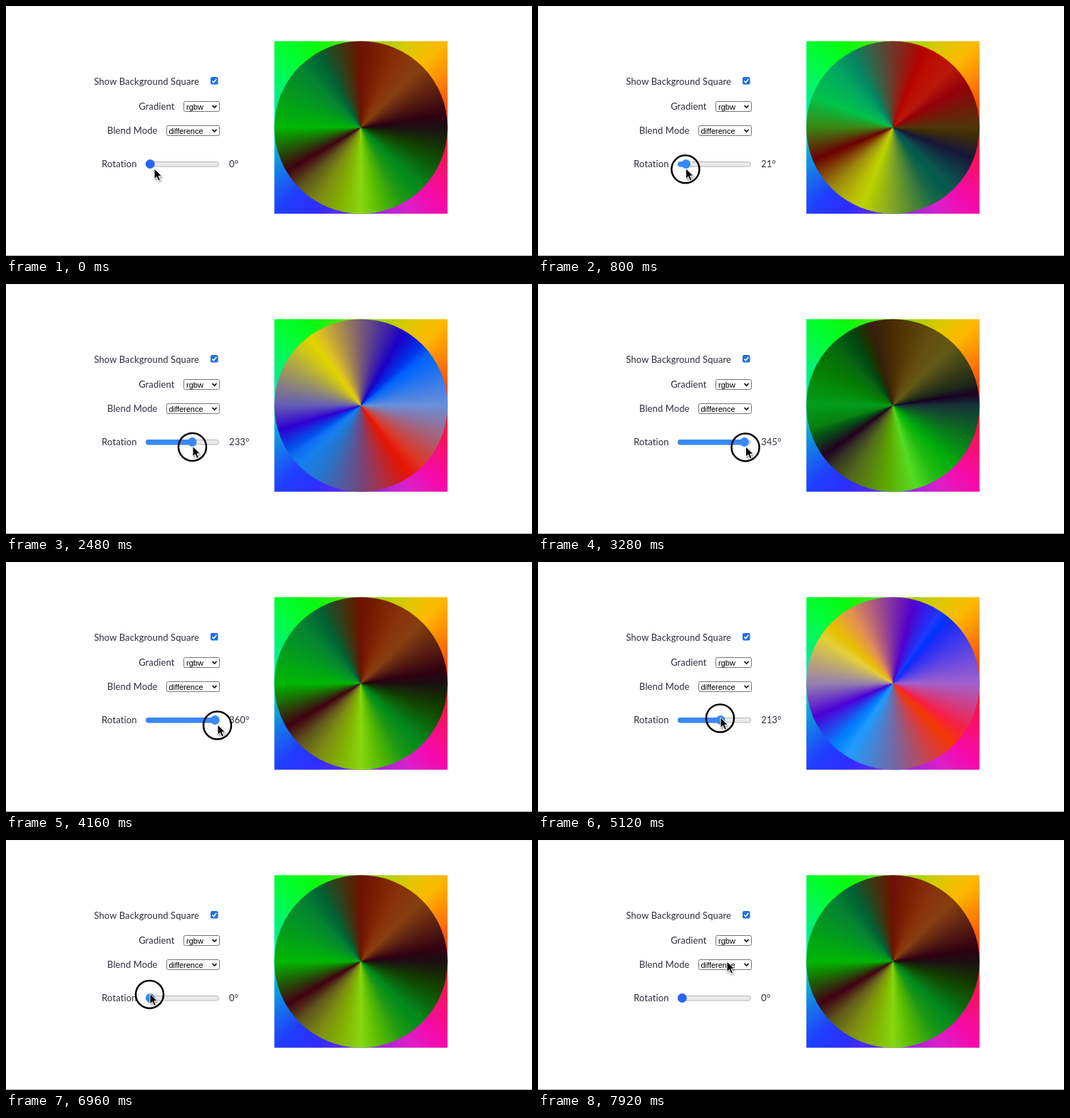
An HTML page that plays this animation: 738x352 px, repeating every 8 s.

```html
<!DOCTYPE html>
<html lang="en">
<head>
<meta charset="utf-8">
<title>Conic gradient blend</title>
<style>
html, body { margin: 0; width: 100%; height: 100%; overflow: hidden; background: #fff; }
#square, #disc {
  --hues: conic-gradient(from 90deg,
    rgb(255, 25, 15), rgb(245, 10, 172) 45deg, rgb(218, 32, 202) 60deg,
    rgb(120, 40, 240) 90deg, rgb(45, 45, 255) 120deg, rgb(32, 62, 255) 135deg,
    rgb(0, 228, 195) 180deg, rgb(0, 255, 50) 225deg, rgb(8, 248, 15) 240deg,
    rgb(120, 220, 8) 270deg, rgb(220, 200, 0) 300deg, rgb(252, 184, 0) 315deg,
    rgb(255, 25, 15));
  position: absolute; left: 376px; top: 49px; width: 244px; height: 244px;
}
#square { background: var(--hues); clip-path: inset(.5px); }
#disc {
  --turn: 0deg;
  clip-path: circle(121.5px);
  background:
    conic-gradient(from calc(90deg + var(--turn)),
      rgb(228, 40, 33), #fff, rgb(0, 45, 200), rgb(10, 203, 0), rgb(228, 40, 33)),
    var(--hues);
  background-blend-mode: difference, normal;
}
svg { position: absolute; left: 0; top: 0; display: block; }
text { font: 13px Lato, sans-serif; letter-spacing: .1px; fill: #2b2d3a; }
.label { text-anchor: end; }
.choice text { font: 11px "Liberation Sans", Arial, sans-serif; letter-spacing: 0; fill: #000; }
.choice rect { fill: #fff; stroke: #767676; }
.choice path { fill: none; stroke: #000; stroke-width: 1.6; }
</style>
</head>
<body>
<div id="square"></div>
<div id="disc"></div>
<svg width="738" height="352" viewBox="0 0 738 352">
  <path d="M0 .5H738" stroke="#f1f1f1"/>
  <path d="M0 351.5H738" stroke="#a3a3a3"/>

  <text class="label" x="271" y="110.5">Show Background Square</text>
  <text class="label" x="236.5" y="145.5">Gradient</text>
  <text class="label" x="212.5" y="179.5">Blend Mode</text>
  <text class="label" x="183.5" y="226.5">Rotation</text>

  <rect x="287" y="100" width="10.5" height="10.5" rx="2" fill="#1f6fe5"/>
  <path d="M289.3 105.5l2.1 2.2 3.9-5" fill="none" stroke="#fff" stroke-width="1.6"/>

  <g class="choice">
    <rect x="249.5" y="134.5" width="50" height="14" rx="2"/>
    <text x="253" y="145.5">rgbw</text>
    <path d="M289.5 140l3 3 3-3"/>
  </g>
  <g class="choice">
    <rect x="225.5" y="168.5" width="74" height="14" rx="2"/>
    <text x="228.5" y="179.5">difference</text>
    <path d="M289.5 174l3 3 3-3"/>
  </g>

  <rect x="196.5" y="219.5" width="102" height="6.5" rx="3.2" fill="#ebe9eb" stroke="#b8b4b8"/>
  <rect id="fill" x="196" y="219" height="7.5" rx="3.7"/>
  <circle id="thumb" cy="222.5" r="6.4"/>
  <text id="value" x="313" y="226.5"></text>

  <g id="pointer">
    <circle id="ring" cx="-.5" cy="1" r="19.5" fill="none" stroke="#000" stroke-width="2.5"/>
    <path d="M0 0V14.5L3.4 11.4 5.8 17 8.4 15.9 6 10.4H10.6Z" stroke="#fff" stroke-width="1"
      style="filter: drop-shadow(1px 2px 1.5px #0006)"/>
  </g>
</svg>
<script>
const LOOP = 8000, STEP = 80;
const PRESS = 400, RELEASE = 7040;

// time, pointer x, pointer y, rotation
const keys = [
  [0, 208, 229, 0],
  [400, 204, 229, 0],
  [560, 204, 229, 3],
  [1440, 230.5, 228, 108],
  [2480, 262, 228.5, 233],
  [3560, 296, 229, 360],
  [4160, 297, 229, 360],
  [5120, 256, 219, 213],
  [6240, 220.5, 216.7, 72],
  [6880, 202, 216.5, 0],
  [7120, 202, 216, 0],
  [7840, 265, 171, 0],
  [8000, 265, 171, 0]
];

const $ = id => document.getElementById(id);
const slope = (i, c) => (keys[i + 1][c] - keys[i][c]) / (keys[i + 1][0] - keys[i][0]);

// Monotone cubic: flat at turning points, harmonic mean elsewhere.
function tangent(i, c) {
  if (i === 0 || i === keys.length - 1) return 0;
  const a = slope(i - 1, c), b = slope(i, c);
  return a * b > 0 ? 2 * a * b / (a + b) : 0;
}

function sample(t, c) {
  let i = 0;
  while (i < keys.length - 2 && t >= keys[i + 1][0]) i++;
  const p = keys[i], q = keys[i + 1], h = q[0] - p[0], u = (t - p[0]) / h;
  const ease = u * u * (3 - 2 * u);
  return p[c] + (q[c] - p[c]) * ease
    + h * u * (1 - u) * ((1 - u) * tangent(i, c) - u * tangent(i + 1, c));
}

function draw(t) {
  const turn = Math.round(sample(t, 3));
  const held = t >= PRESS && t < RELEASE;
  const thumbX = 202.3 + turn * 91 / 360;
  const blue = held ? "#3889f4" : "#2866f0";

  $("disc").style.setProperty("--turn", turn + "deg");
  $("value").textContent = turn + "°";
  $("thumb").setAttribute("cx", thumbX);
  $("thumb").setAttribute("fill", blue);
  $("fill").setAttribute("width", thumbX - 196);
  $("fill").setAttribute("fill", blue);
  $("ring").setAttribute("visibility", held ? "visible" : "hidden");
  $("pointer").setAttribute("transform", `translate(${sample(t, 1)} ${sample(t, 2)})`);
}

const start = performance.now();
function tick() {
  const t = (performance.now() - start) % LOOP;
  draw(Math.floor(t / STEP) * STEP);
  requestAnimationFrame(tick);
}
tick();
</script>
</body>
</html>
```
